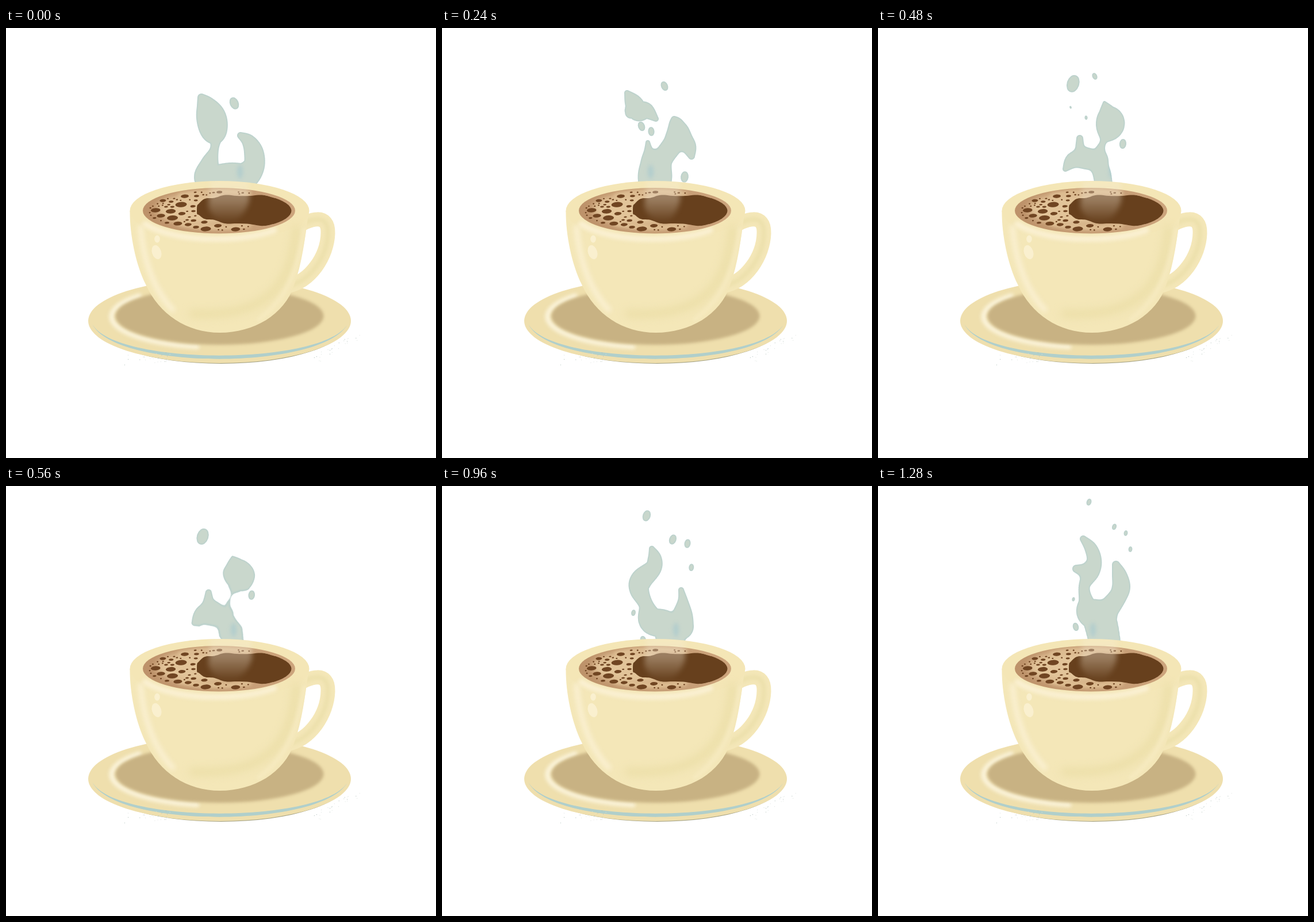
Write an HTML page with a canvas that moves like this. It is 748x748 px and loops after 1360 ms.

```html
<!DOCTYPE html>
<html lang="en">
<head>
<meta charset="utf-8">
<title>Coffee cup</title>
<style>
html, body { margin: 0; width: 100%; height: 100%; overflow: hidden; background: #fff; }
canvas { display: block; }
</style>
</head>
<body>
<canvas id="stage" width="748" height="748"></canvas>
<script>
const SIZE = 748, STEP = 80, STEPS = 17, RISE = 7;
const BOX = { x: 300, w: 160, h: 290 };

// Steam poses: strands of tapering smoke, each a run of x, y, radius.
const poses = [
  { at: 0, strands: [
    [340,121,7, 349,136,17, 357,156,26, 361,176,24, 364,194,11, 362,212,8, 354,237,16, 352,262,24, 390,260,26,
     415,258,24, 431,240,19, 431,216,17, 422,197,12, 408,187,6]] },
  { at: 3, strands: [
    [322,113,5, 333,130,15, 341,144,18, 355,144,14, 372,158,5],
    [358,199,4, 360,215,9, 367,236,22, 369,262,28, 372,285,28],
    [404,159,6, 408,170,14, 411,188,20, 399,206,18, 382,230,19, 372,255,28],
    [411,188,20, 428,205,14, 434,223,6]] },
  { at: 6, strands: [
    [394,130,3, 400,150,16, 404,168,25, 393,195,7, 386,214,9, 384,235,15, 390,256,16, 394,285,15],
    [351,192,6, 352,210,9, 360,226,17, 382,230,18],
    [326,245,5, 340,230,14, 362,226,17]] },
  { at: 9, strands: [
    [385,135,13, 398,124,14, 414,124,13, 428,140,13, 421,163,4],
    [355,170,4, 355,186,11, 352,208,21, 349,230,22, 370,238,19, 400,246,22, 403,285,29],
    [410,224,5, 410,245,17, 408,270,24]] },
  { at: 12, strands: [
    [365,109,5, 370,126,12, 367,143,15, 347,163,19, 343,180,17, 355,207,13, 365,234,23, 390,244,25, 400,285,24],
    [416,181,5, 419,200,9, 418,225,18, 414,244,24]] },
  { at: 14, strands: [
    [360,108,6, 373,124,11, 377,146,15, 366,160,17, 347,170,17, 356,195,14, 361,215,17, 364,236,24, 392,242,23, 403,285,29],
    [401,178,7, 418,186,13, 431,200,16, 420,222,18, 407,248,21]] },
  { at: 16, strands: [
    [357,92,6, 370,108,11, 376,128,13, 371,148,15, 359,174,10, 362,200,13, 368,219,23, 385,232,29, 397,285,27],
    [414,137,7, 420,155,13, 423,175,16, 417,192,16, 400,215,19],
    [345,144,7, 362,148,13]] }
];

// Drops that tear off and float up while they shrink.
const drops = [
  { life: [3, 16], from: [331, 140, 15], to: [367, 28, 5] },
  { life: [3, 16], from: [422, 259, 8], to: [439, 110, 4] },
  { life: [0, 6], from: [397, 131, 9], to: [377, 84, 5] },
  { life: [3, 6], from: [347, 171, 7], to: [335, 138, 2] },
  { life: [3, 6], from: [364, 180, 6.5], to: [362, 156, 3] },
  { life: [8, 16], from: [326, 262, 6], to: [340, 197, 3] },
  { life: [11, 16], from: [399, 105, 8], to: [411, 71, 4.5] },
  { life: [11, 16], from: [426, 110, 7], to: [431, 82, 4] },
  { life: [12, 16], from: [350, 268, 6], to: [344, 245, 6] }
];

const clamp = (v, lo, hi) => Math.max(lo, Math.min(hi, v));
const mix = (a, b, t) => a + (b - a) * t;

function makeRandom(seed) {
  return () => (seed = seed * 16807 % 2147483647) / 2147483647;
}

function makeLayer(w = SIZE, h = SIZE) {
  const c = document.createElement('canvas');
  c.width = w;
  c.height = h;
  return c.getContext('2d');
}

function oval(x, y, rx, ry, angle = 0) {
  const path = new Path2D();
  path.ellipse(x, y, rx, ry, angle, 0, Math.PI * 2);
  return path;
}

// Part of an ellipse outline, angles in degrees.
function arc(x, y, rx, ry, from, to) {
  const path = new Path2D();
  path.ellipse(x, y, rx, ry, 0, from * Math.PI / 180, to * Math.PI / 180);
  return path;
}

function fill(g, path, color, blur = 0) {
  g.filter = blur ? `blur(${blur}px)` : 'none';
  g.fillStyle = color;
  g.fill(path);
  g.filter = 'none';
}

function stroke(g, path, color, width, blur = 0) {
  g.filter = blur ? `blur(${blur}px)` : 'none';
  g.strokeStyle = color;
  g.lineWidth = width;
  g.lineCap = 'round';
  g.stroke(path);
  g.filter = 'none';
}

function within(g, path, draw) {
  g.save();
  g.clip(path);
  draw();
  g.restore();
}

function drawSaucer(g) {
  const plate = oval(371.5, 509.5, 228.5, 73.5);
  fill(g, oval(374, 511, 222, 73), '#a3a183');
  fill(g, plate, '#efdfad');
  within(g, plate, () => {
    stroke(g, arc(371.5, 502, 188, 54, 102, 222), '#fbf4dc', 8, 3);
    fill(g, new Path2D('M150 515C190 596 553 596 595 514C555 588 190 588 150 515Z'), '#b0cfcb');
  });
  fill(g, oval(371.5, 501, 181, 50), '#c8b283', 2.5);

  const random = makeRandom(7);
  for (let i = 0; i < 56; i++) {
    const side = i % 2 ? 1 : -1, spread = random();
    const x = side < 0 ? mix(206, 285, spread) : mix(535, 620, spread);
    const y = mix(578, side < 0 ? 572 : 530, spread) + (random() - .5) * 18;
    g.fillStyle = i % 3 ? '#dbe2dd' : '#a9bab4';
    g.fillRect(x, y, 1, 1);
  }
}

function drawHandle(g) {
  const spine = new Path2D('M500 350C530 330 561 322 560 357C559 396 530 442 488 449');
  stroke(g, spine, '#f4e7b8', 25);
  stroke(g, spine, '#ebdfaa', 7, 3);
}

// Dark surface: a squarish oval with a rippled edge that is flatter at the lower left.
function darkCoffee() {
  const path = new Path2D(), power = v => Math.sign(v) * Math.abs(v) ** (2 / 2.7);
  for (let i = 0; i < 180; i++) {
    const a = i * Math.PI / 90, c = Math.cos(a), s = Math.sin(a);
    const height = s < 0 ? 27 : mix(16, 31, (c + 1) / 2);
    path.lineTo(413.5 + 82.5 * power(c) + Math.cos(6 * a), 318 + height * power(s) + 1.3 * Math.sin(11 * a));
  }
  path.closePath();
  return path;
}

function drawBubbles(g, dark) {
  const random = makeRandom(29), inner = oval(370.5, 318, 124, 35), placed = [];
  for (let tries = 0; tries < 3000 && placed.length < 62; tries++) {
    const r = Math.max(1.5, 10 * .955 ** placed.length);
    const x = mix(246, 425, random() ** 1.4), y = mix(283, 352, random());
    const clear = [-1, 0, 1].every(k =>
      g.isPointInPath(inner, x + k * r, y) && !g.isPointInPath(dark, x + (r + 2) * k, y + 3 * k) &&
      !g.isPointInPath(dark, x, y + k * (r * .45 + 2)));
    const apart = placed.every(b => Math.hypot(x - b.x, (y - b.y) * 2) > r + b.r + 2);
    if (clear && apart) placed.push({ x, y, r });
  }
  placed.forEach(b => fill(g, oval(b.x, b.y, b.r, Math.max(1.2, b.r * .45), -.06), '#704522'));
}

function drawCoffee(g) {
  const surface = oval(370.5, 317.8, 132.5, 39.8), dark = darkCoffee();
  const tan = g.createLinearGradient(238, 0, 503, 0);
  tan.addColorStop(0, '#bd926a');
  tan.addColorStop(1, '#cca47c');
  fill(g, surface, tan);
  within(g, surface, () => {
    fill(g, oval(338, 315, 76, 28), '#e2c499', 6);
    stroke(g, arc(370, 316, 105, 31, 60, 130), '#e0c195', 9, 3);
    stroke(g, arc(370, 318, 105, 34, 230, 300), '#e0c195', 7, 3);
    within(g, oval(370.5, 318, 126, 35), () => fill(g, dark, '#67401d'));
    drawBubbles(g, dark);
  });
}

function drawCup(g) {
  const body = new Path2D('M215.5 318C215 360 226 412 243 446C266 498 315 530 372 530C431 530 484 499 501 448C515 410 520 366 527 318Z');
  fill(g, body, '#f4e7b8');
  fill(g, oval(371.5, 318, 156, 52), '#f4e6b6');
  within(g, body, () => {
    stroke(g, new Path2D('M505 350C498 430 470 505 325 497'), '#ecdfa9', 14, 7);
    stroke(g, new Path2D('M519 350C508 420 490 470 440 507'), '#f6eac0', 7, 3);
    stroke(g, new Path2D('M234 347C238 400 256 455 290 490'), '#faf0d2', 9, 4);
    stroke(g, arc(366, 318, 140, 49, 44, 152), '#faf0d2', 10, 3);
  });
  fill(g, oval(263, 367, 4.8, 6.5), '#faf0cf');
  fill(g, oval(262, 390, 8, 12.5, -.3), '#faf0cf');
  drawCoffee(g);
}

// Circles along a smooth curve through the strand's points.
function beads(strand, dy) {
  const n = strand.length / 3, list = [];
  const at = i => strand.slice(3 * clamp(i, 0, n - 1), 3 * clamp(i, 0, n - 1) + 3);
  for (let i = 0; i < n - 1; i++) {
    const [a, b, c, d] = [at(i - 1), at(i), at(i + 1), at(i + 2)];
    for (let t = 0; t <= 1; t += .125) {
      const [x, y, r] = b.map((v, k) => v + .5 * t * (c[k] - a[k] +
        t * (2 * a[k] - 5 * v + 4 * c[k] - d[k] + t * (3 * (v - c[k]) + d[k] - a[k]))));
      list.push([x, y + dy, r]);
    }
  }
  return list;
}

function depthIn(circles, x, y) {
  let best = -99;
  for (const [cx, cy, r] of circles) best = Math.max(best, r - Math.sqrt((x - cx) ** 2 + (y - cy) ** 2));
  return best;
}

function join(a, b, soft = 7) {
  const h = Math.max(soft - Math.abs(a - b), 0) / soft;
  return Math.max(a, b) + h * h * soft / 4;
}

// Depth inside the strands, positive within the smoke.
function smokeDepth(pose, dy) {
  const strands = pose.strands.map(s => beads(s, dy));
  return (x, y) => clamp(strands.map(s => depthIn(s, x, y)).reduce((a, b) => join(a, b)), -10, 10);
}

function dropCircles({ life, from, to }, step) {
  if (step < life[0] || step > life[1]) return [];
  const u = (step - life[0]) / (life[1] - life[0]);
  const x = mix(from[0], to[0], u), y = mix(from[1], to[1], u ** .65), r = mix(from[2], to[2], u);
  const dx = to[0] - from[0], dy = to[1] - from[1], reach = r * .5 / Math.hypot(dx, dy);
  return [-1, -.5, 0, .5, 1].map(k => [x + k * dx * reach, y + k * dy * reach, r * (.85 - .15 * k * k)]);
}

function buildSteam(step) {
  const next = Math.max(1, poses.findIndex(p => p.at >= step));
  const a = poses[next - 1], b = poses[next], span = b.at - a.at, t = (step - a.at) / span;
  const before = smokeDepth(a, -RISE * span * t), after = smokeDepth(b, RISE * span * (1 - t));
  const floating = drops.flatMap(drop => dropCircles(drop, step));
  const g = makeLayer(BOX.w, BOX.h), image = g.createImageData(BOX.w, BOX.h);
  for (let i = 0; i < BOX.w * BOX.h; i++) {
    const x = BOX.x + i % BOX.w + .5, y = Math.floor(i / BOX.w) + .5;
    const smoke = mix(t < 1 ? before(x, y) : 0, t > 0 ? after(x, y) : 0, t);
    const depth = Math.max(smoke, depthIn(floating, x, y));
    const edge = clamp((3 - depth) / 3, 0, 1);
    image.data.set([mix(201, 184, edge), mix(215, 208, edge), mix(204, 204, edge), 255 * clamp(depth + .5, 0, 1)], 4 * i);
  }
  g.putImageData(image, 0, 0);
  g.globalCompositeOperation = 'source-atop';
  fill(g, oval(385 + 22 * Math.cos(step * Math.PI / 3) - BOX.x, 250, 5, 12), 'rgba(169,203,207,.7)', 3);
  return g.canvas;
}

function drawGlow(g, step) {
  const right = 423 - 9 * Math.sin(step * Math.PI / 6);
  const shade = g.createLinearGradient(0, 266, 0, 338);
  shade.addColorStop(0, 'rgba(250,242,220,.25)');
  shade.addColorStop(.4, 'rgba(240,228,208,.4)');
  shade.addColorStop(1, 'rgba(240,228,208,0)');
  within(g, oval(371.5, 318, 156, 52), () =>
    fill(g, new Path2D(`M356 262H${right}V300Q${right - 8} 332 385 340Q356 330 352 310Z`), shade, 5));
}

const stage = document.getElementById('stage').getContext('2d');
const cup = makeLayer();
drawSaucer(cup);
drawHandle(cup);
drawCup(cup);

const frames = Array.from({ length: STEPS }, (_, step) => {
  const g = makeLayer();
  g.fillStyle = '#fff';
  g.fillRect(0, 0, SIZE, SIZE);
  g.drawImage(buildSteam(step), BOX.x, 0);
  g.drawImage(cup.canvas, 0, 0);
  drawGlow(g, step);
  return g.canvas;
});

const start = performance.now();
function loop() {
  const step = Math.floor((performance.now() - start) / STEP) % STEPS;
  stage.drawImage(frames[step], 0, 0);
  requestAnimationFrame(loop);
}
loop();
</script>
</body>
</html>
```
